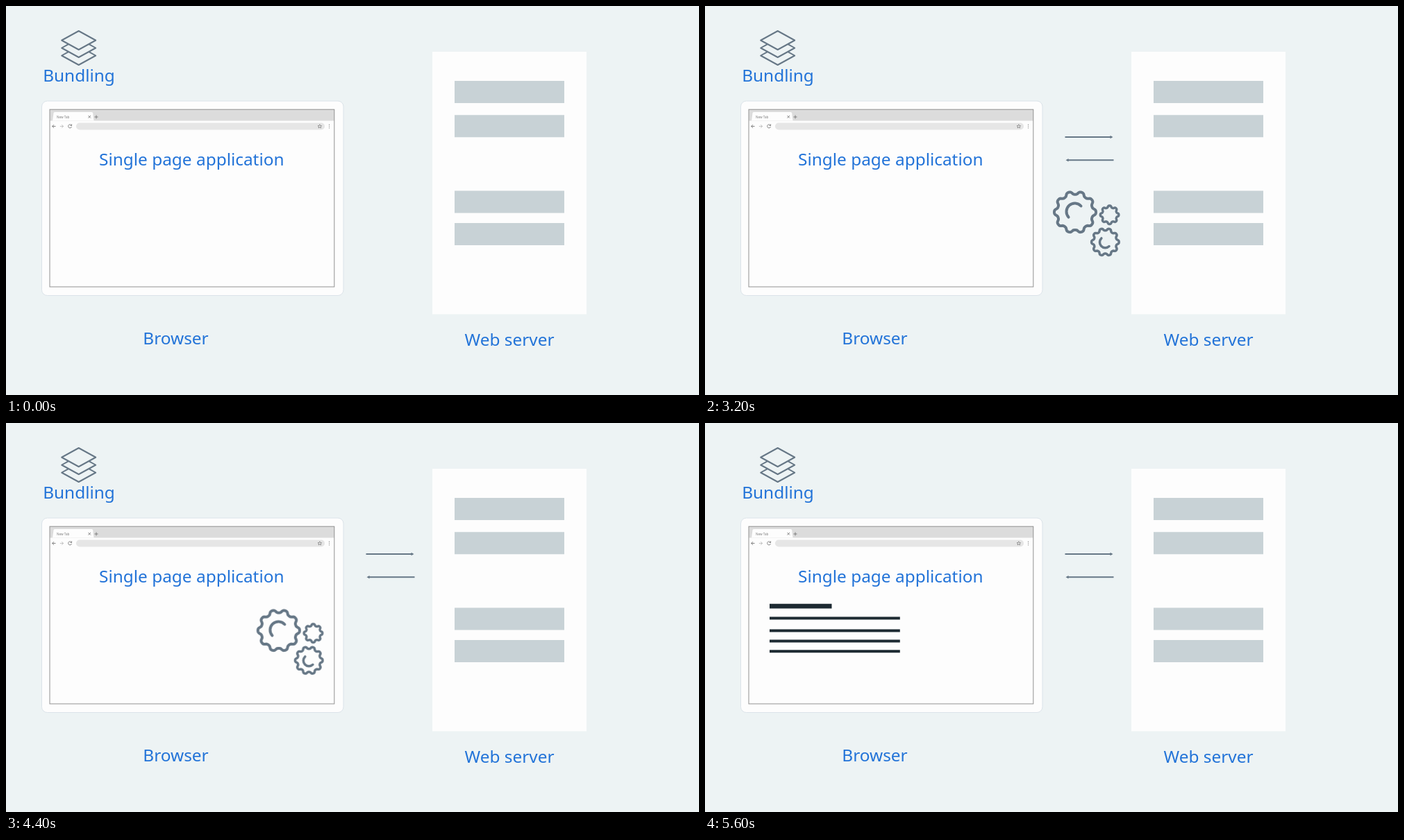
Recreate the animation shown at these times as an HTML page. Size 998 by 561 pixels, loop 6200 ms.

```html
<!DOCTYPE html>
<html lang="en">
<head>
<meta charset="utf-8">
<title>Bundling</title>
<style>
  html, body { margin: 0; width: 100%; height: 100%; overflow: hidden; background: #edf3f4; }
  svg { display: block; width: 100%; height: 100%; }

  .label { font: 500 24.4px "Noto Sans", "Open Sans", sans-serif; fill: #2273d8; text-anchor: middle; }
  .tab-name { font: 4.6px "Open Sans", sans-serif; fill: #777; }
  .paper { fill: #fdfdfd; }
  .slots { fill: #c8d2d6; }
  .icon { fill: none; stroke: #667786; stroke-linejoin: round; stroke-linecap: round; }
  .chrome { fill: none; stroke: #777; stroke-width: .9; }
  .arrow { fill: #667786; }

  .wipe, #gearbox, #content { animation: 6.2s infinite step-end; }
  #wipe-out { animation-name: request; }
  #wipe-back { animation-name: response; }
  #gearbox { animation-name: gears; }
  #content { animation-name: content; fill: #1d2a32; }

  @keyframes request {
    0% { transform: translateX(0); }
    25.806% { transform: translateX(18px); animation-timing-function: steps(3); }
    30.645%, 100% { transform: translateX(80px); }
  }
  @keyframes response {
    0% { transform: translateX(0); }
    41.935% { transform: translateX(18px); animation-timing-function: steps(3); }
    46.774%, 100% { transform: translateX(80px); }
  }
  @keyframes gears {
    0% { opacity: 0; }
    51.612% { opacity: 1; }
    79.032%, 100% { opacity: 0; }
  }
  @keyframes content {
    0% { opacity: 0; }
    83.87% { opacity: .14; animation-timing-function: steps(4); }
    90.322%, 100% { opacity: 1; }
  }
</style>
</head>
<body>
<svg viewBox="0 0 998 561">
  <defs>
    <linearGradient id="soft">
      <stop offset=".9" stop-color="#fff"/>
      <stop offset="1" stop-color="#fff" stop-opacity="0"/>
    </linearGradient>
    <mask id="mask-out" maskUnits="userSpaceOnUse" x="-5" y="-5" width="80" height="10">
      <rect id="wipe-out" class="wipe" x="-90" y="-5" width="90" height="10" fill="url(#soft)"/>
    </mask>
    <mask id="mask-back" maskUnits="userSpaceOnUse" x="-5" y="-5" width="80" height="10">
      <rect id="wipe-back" class="wipe" x="-90" y="-5" width="90" height="10" fill="url(#soft)"/>
    </mask>
    <path id="arrow" d="M0-1H65V-2.3L69 0 65 2.3V1H0Z"/>
  </defs>

  <!-- bundling icon -->
  <g class="icon" stroke-width="2">
    <path d="M104.7 36 129.2 49.5 104.7 63 80.2 49.5Z"/>
    <path d="M89.5 55.3 80.2 60.5 104.7 74 129.2 60.5 119.9 55.3"/>
    <path d="M89.5 66.3 80.2 71.5 104.7 85 129.2 71.5 119.9 66.3"/>
  </g>
  <text class="label" x="105" y="109">Bundling</text>

  <!-- browser -->
  <rect class="paper" x="51.5" y="137" width="434.5" height="280.5" rx="8" stroke="#dbe3e9"/>
  <path fill="#dcdcdc" d="M63 149H473V165.5H63Z"/>
  <path class="paper" d="M67 165.5 68.5 154.5Q68.7 153 70 153H123.5Q125 153 125.2 154.5L126.500 165.500Z"/>
  <text class="tab-name" x="73" y="161.600">New Tab</text>
  <rect x="101" y="168.500" width="358" height="10" rx="5" fill="#e6e6e6"/>
  <g class="chrome">
    <path d="M118.500 158 122 161.500M122 158 118.500 161.500M127.500 160H132.500M130 157.500V162.500"/>
    <path d="M71.500 173.500H66.700M69 171.200 66.700 173.500 69 175.800"/>
    <path stroke="#bbb" d="M77.800 173.500H82.600M80.300 171.200 82.600 173.500 80.300 175.800"/>
    <path d="M94.200 172A2.500 2.500 0 1 0 94.500 174.200M94.600 170.500V172.500H92.600"/>
    <path stroke-width=".7" d="M451.800 170.700 452.600 172.600 454.600 172.700 453.100 174 453.600 176 451.800 174.900 450 176 450.500 174 449 172.700 451 172.600Z"/>
    <path stroke-width="1.200" stroke-linecap="round" d="M465.500 171.200h.01M465.500 173.500h.01M465.500 175.800h.01"/>
  </g>
  <rect x="63" y="149.200" width="409.800" height="255.800" fill="none" stroke="#929292"/>
  <text class="label" x="267.300" y="230">Single page application</text>
  <text class="label" x="244.500" y="488">Browser</text>

  <g id="content">
    <path d="M93 260.800H182.500V267.500H93Z"/>
    <path d="M93 279.500H280.800v4H93ZM93 297.500H280.800v4H93ZM93 312.500H280.800v4H93ZM93 327.300H280.800v4H93Z"/>
  </g>

  <!-- server -->
  <path class="paper" d="M614 66H836V444.500H614Z"/>
  <path class="slots" d="M646 108H804v32H646ZM646 157.300H804v32H646ZM646 266.500H804v32H646ZM646 313H804v32H646Z"/>
  <text class="label" x="725" y="489.500">Web server</text>

  <!-- traffic -->
  <g class="arrow" transform="translate(518.500 189)"><use href="#arrow" mask="url(#mask-out)"/></g>
  <g class="arrow" transform="translate(588.500 222.300) rotate(180)"><use href="#arrow" mask="url(#mask-back)"/></g>

  <g id="gearbox">
    <g id="gears" class="icon">
      <path stroke-width="4" d="M523.600 304.600A12 12 0 0 1 541.500 288.500"/>
      <path stroke-width="3.500" d="M570.900 334.900A8 8 0 0 0 582 346.500"/>
    </g>
  </g>
</svg>
<script>
  const LOOP = 6200, STEP = 100;
  const gears = document.getElementById('gears');

  function addGear(cx, cy, radius, depth, teeth, weight) {
    const count = teeth * 16;
    const points = Array.from({ length: count }, (_, i) => {
      const a = i / count * 2 * Math.PI;
      const r = radius - depth / 2 + depth / 2 * Math.tanh(1.5 * Math.cos(teeth * a)) / Math.tanh(1.5);
      return (cx + r * Math.cos(a)).toFixed(2) + ' ' + (cy + r * Math.sin(a)).toFixed(2);
    });
    const path = document.createElementNS(gears.namespaceURI, 'path');
    path.setAttribute('d', 'M' + points.join('L') + 'Z');
    path.setAttribute('stroke-width', weight);
    gears.append(path);
  }

  addGear(533, 297.3, 30, 4.4, 10, 4);
  addGear(582.6, 301.2, 13.3, 2.6, 8, 3.4);
  addGear(576.4, 340.4, 19.8, 3.2, 10, 3.5);

  // Eased slide into the browser, held for one step at a time
  const slide = { start: 3400, end: 4880, x: -184, y: 2.5 };
  const pose = t => {
    const u = Math.min(1, Math.max(0, (t - slide.start) / (slide.end - slide.start)));
    const k = (1 - Math.cos(Math.PI * u)) / 2;
    return { offset: t / LOOP, easing: 'step-end', transform: `translate(${slide.x * k}px, ${slide.y * k}px)` };
  };
  const poses = [pose(0)];
  for (let t = slide.start; t < slide.end; t += STEP) poses.push(pose(t));
  poses.push(pose(LOOP));
  gears.animate(poses, { duration: LOOP, iterations: Infinity });
</script>
</body>
</html>
```
